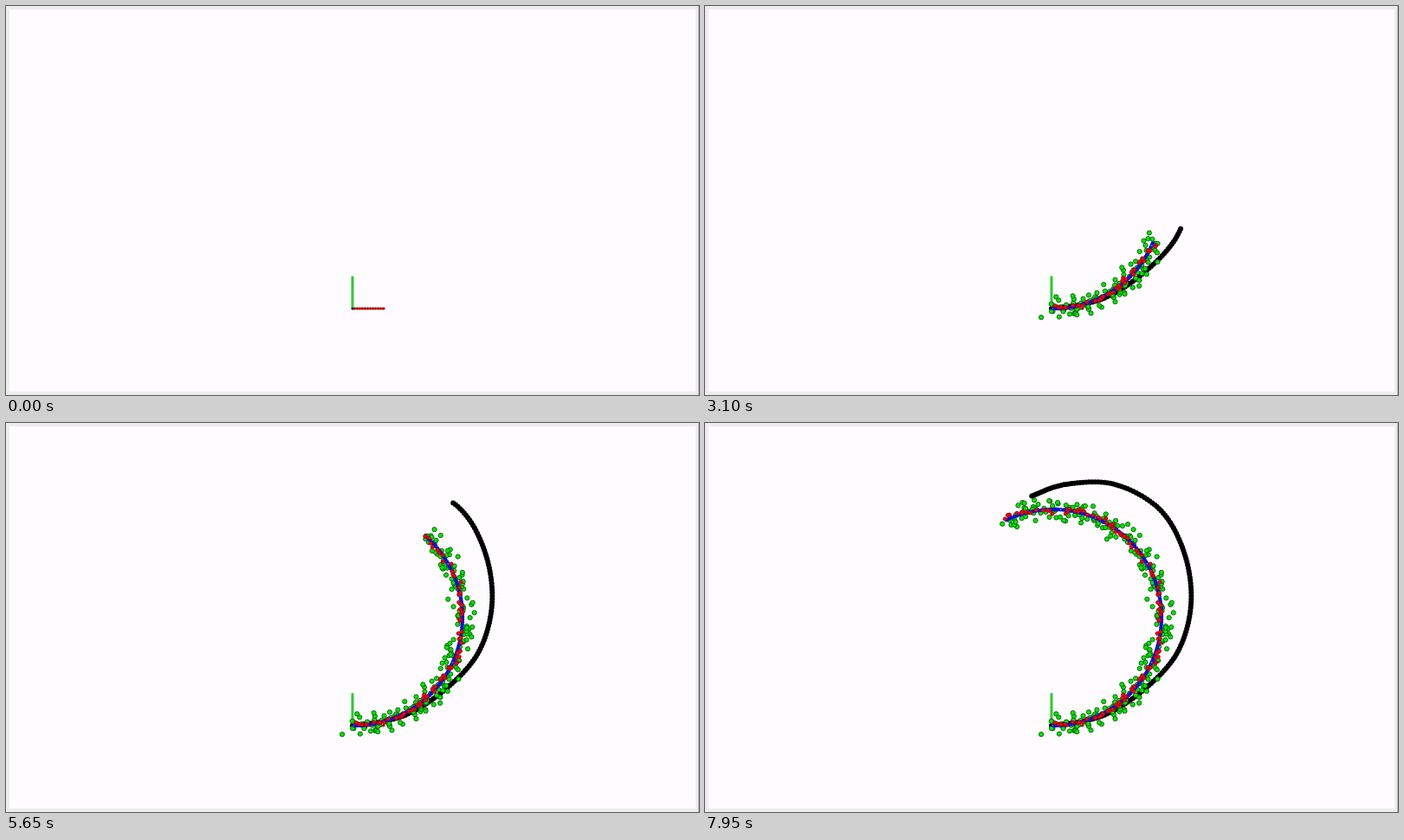
An HTML page with a canvas that plays this animation: 800 px wide and 450 px high, repeating every 8000 ms.

```html
<!DOCTYPE html>
<html lang="en">
<head>
<meta charset="utf-8">
<title>Trajectory tracking</title>
<style>
html, body { margin: 0; width: 100%; height: 100%; overflow: hidden; background: #eeedee; }
canvas { display: block; }
</style>
</head>
<body>
<canvas id="stage" width="800" height="450"></canvas>
<script>
const ctx = document.getElementById('stage').getContext('2d');
const LOOP = 8000, START = 450, STEP = 50;
const COUNT = (LOOP - START) / STEP + 1;

// Waypoints of the drifting odometry, evenly spaced along its path
const waypoints = [
  [400, 350], [457, 339.5], [506, 309], [545, 266], [561, 210],
  [553.5, 151], [525, 100], [473, 71], [416.5, 71], [376, 85]
];

// Catmull-Rom curve through the waypoints, u from 0 to 1
function driftAt(u) {
  const last = waypoints.length - 1;
  const i = Math.min(last - 1, Math.floor(u * last)), f = u * last - i;
  const [a, b, c, d] = [i - 1, i, i + 1, i + 2]
    .map(k => waypoints[Math.min(last, Math.max(0, k))]);
  return [0, 1].map(k => b[k] + f / 2 * (c[k] - a[k]
    + f * (2 * a[k] - 5 * b[k] + 4 * c[k] - d[k]
    + f * (3 * (b[k] - c[k]) + d[k] - a[k]))));
}

// True path: a circle run from its lowest point
function truthAt(u, radius = 125) {
  const angle = 207 * u ** 1.08 * Math.PI / 180;
  return [402 + Math.sin(angle) * radius, 225 + Math.cos(angle) * radius];
}

// Mulberry32 generator
let seed = 7;
function random() {
  seed = (seed + 0x6d2b79f5) | 0;
  let n = Math.imul(seed ^ (seed >>> 15), 1 | seed);
  n = (n + Math.imul(n ^ (n >>> 7), 61 | n)) ^ n;
  return ((n ^ (n >>> 14)) >>> 0) / 4294967296;
}
const noise = range => (random() + random() - 1) * range;
const scatter = ([x, y], range) => [x + noise(range), y + noise(range)];

const points = Array.from({ length: COUNT }, (_, i) => {
  const u = i / (COUNT - 1);
  const truth = truthAt(u);
  return {
    drift: driftAt(u),
    truth,
    measured: [scatter(truth, 15), scatter(truth, 15)],
    estimate: scatter(truthAt(u, 125 - 2 * Math.sin(i / 5)), 4),
    estimateShown: random() < 0.65
  };
});

function dot([x, y], radius, fill, outline) {
  ctx.beginPath();
  ctx.arc(x, y, radius, 0, 2 * Math.PI);
  ctx.fillStyle = fill;
  ctx.fill();
  if (outline) {
    ctx.strokeStyle = outline;
    ctx.lineWidth = 0.9;
    ctx.stroke();
  }
}

function rect(color, x, y, w, h) {
  ctx.fillStyle = color;
  ctx.fillRect(x, y, w, h);
}

function drawScene() {
  rect('#eeedee', 0, 0, 800, 450);
  rect('#fefcff', 4, 4, 792, 442);
  rect('#aaa9ab', 799, 0, 1, 450);
  rect('#d40000', 400, 348.7, 37.5, 2.6);
  for (let x = 402; x < 437; x += 3) rect('#800000', x, 348.7, 1, 2.6);
  rect('#2ccb2c', 398.5, 312.5, 3, 37.5);
  dot([400, 350], 1.5, '#000080');
}

function draw(now) {
  const t = now % LOOP;
  const shown = points.slice(0, Math.max(0, Math.floor((t - START) / STEP) + 1));
  drawScene();
  shown.forEach(p => dot(p.drift, 3, '#000'));
  shown.forEach(p => p.measured.forEach(m => dot(m, 2.6, '#00e600', '#045c04')));
  shown.forEach((p, i) => {
    dot(p.truth, 2.3, '#1010d0');
    if (i % 13 === 0) dot(p.truth, 1, '#30a0d0');
  });
  shown.filter(p => p.estimateShown)
    .forEach(p => dot(p.estimate, 2.1, '#f80010', '#a00010'));
  requestAnimationFrame(draw);
}
requestAnimationFrame(draw);
</script>
</body>
</html>
```
